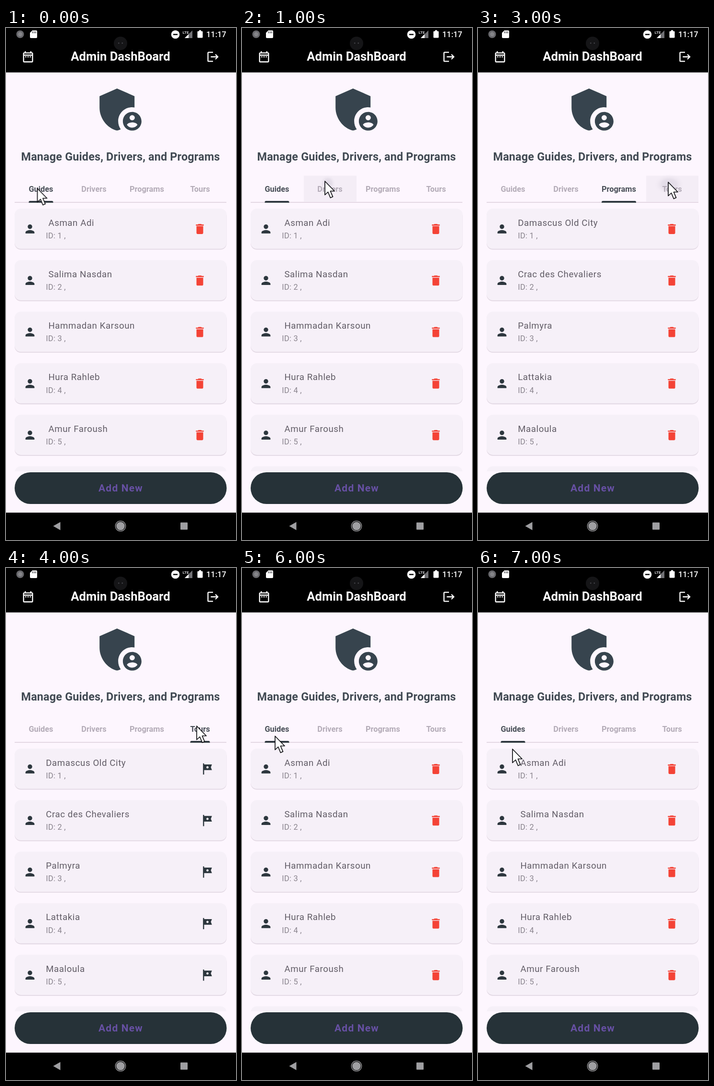
An HTML page that plays this animation: 480 by 1066 pixels, repeating every 8000 ms.

```html
<!DOCTYPE html>
<html lang="en">
<head>
<meta charset="utf-8">
<title>Admin DashBoard</title>
<style>
  html, body { margin: 0; width: 100%; height: 100%; overflow: hidden; background: #fdf6fe; }
  svg { display: block; width: 100vw; height: 100vh; font-family: Roboto, Arial, sans-serif; }
  .mid { text-anchor: middle; }
  .bold { font-weight: 700; }
  .title { font-size: 25.6px; fill: #fff; }
  .heading { font-size: 23.36px; letter-spacing: .18px; fill: #414a53; }
  .tab { font-size: 16.35px; fill: #b3abb7; }
  .tab.on { fill: #474d56; }
  .name { font-size: 18.7px; letter-spacing: .58px; fill: #625d67; white-space: pre; }
  .id { font-size: 16.35px; letter-spacing: .29px; fill: #8a848e; }
  .add { font-size: 21px; letter-spacing: 1.17px; fill: #6750a4; }
  .clock { font-size: 16.4px; font-weight: 500; fill: #fff; }

  .view, .ink { opacity: 0; animation: 8s step-end infinite; }
  #guides { animation-name: guides; }
  #drivers, #ink2 { animation-name: third; }
  #programs, #ink3 { animation-name: fourth; }
  #tours { animation-name: tours; }
  #ink1 { animation-name: second; }
  #pointer { animation: point 8s step-end infinite; }

  @keyframes guides { 0% { opacity: 1 } 25% { opacity: 0 } 75%, 100% { opacity: 1 } }
  @keyframes second { 0% { opacity: 0 } 12.5% { opacity: 1 } 25%, 100% { opacity: 0 } }
  @keyframes third { 0% { opacity: 0 } 25% { opacity: 1 } 37.5%, 100% { opacity: 0 } }
  @keyframes fourth { 0% { opacity: 0 } 37.5% { opacity: 1 } 50%, 100% { opacity: 0 } }
  @keyframes tours { 0% { opacity: 0 } 50% { opacity: 1 } 75%, 100% { opacity: 0 } }
  @keyframes point {
    0% { transform: translate(65.5px, 334px) }
    12.5% { transform: translate(173px, 319px) }
    25% { transform: translate(356.5px, 321px) }
    37.5% { transform: translate(397px, 321px) }
    50% { transform: translate(398px, 329px) }
    62.5% { transform: translate(67px, 328px) }
    75% { transform: translate(69px, 350px) }
    87.5%, 100% { transform: translate(72px, 377px) }
  }
</style>
</head>
<body>
<svg viewBox="0 0 480 1066" preserveAspectRatio="none">
  <defs>
    <path id="person" d="M12 12c2.21 0 4-1.79 4-4s-1.79-4-4-4-4 1.79-4 4 1.79 4 4 4zm0 2c-2.67 0-8 1.34-8 4v2h16v-2c0-2.66-5.33-4-8-4z"/>
    <path id="bin" d="M6 19c0 1.1.9 2 2 2h8c1.1 0 2-.9 2-2V7H6v12zM19 4h-3.5l-1-1h-5l-1 1H5v2h14V4z"/>
    <path id="flag" d="M21 4H7V2H5v20h2v-8h14l-2-5 2-5zm-6 5c0 1.1-.9 2-2 2s-2-.9-2-2 .9-2 2-2 2 .9 2 2z"/>
    <radialGradient id="glow">
      <stop offset="0" stop-color="#dfd9e5"/>
      <stop offset=".5" stop-color="#e4dde8" stop-opacity=".85"/>
      <stop offset="1" stop-color="#f4edf6" stop-opacity="0"/>
    </radialGradient>
    <clipPath id="list"><rect y="366" width="480" height="557"/></clipPath>
  </defs>

  <rect width="480" height="1066" fill="#fdf6fe"/>

  <!-- status and app bar -->
  <rect width="480" height="92.5"/>
  <circle cx="29.5" cy="13" r="8" fill="#68686c"/>
  <circle cx="29.5" cy="13" r="4.5" fill="#858589"/>
  <path d="M55 5h8a2 2 0 0 1 2 2v12a2 2 0 0 1-2 2H52a2 2 0 0 1-2-2V10z" fill="#fff"/>
  <path d="M55.5 7v4M58.8 7v4M62 7v4" stroke="#4c4c50" stroke-width="1.5"/>
  <circle cx="353.5" cy="13.5" r="8.8" fill="#fff"/>
  <path d="M349 13.5h9" stroke="#000" stroke-width="2.5"/>
  <path d="M389 5v16h-16z" fill="#707074"/>
  <path d="M381 13v8h-8z" fill="#fff"/>
  <text x="368.5" y="12" font-size="8" class="bold" fill="#d2d2d6">LTE</text>
  <path d="M403 4.5h4v2h2a1.5 1.5 0 0 1 1.5 1.5v11a1.5 1.5 0 0 1-1.5 1.5h-8a1.5 1.5 0 0 1-1.5-1.5V8a1.5 1.5 0 0 1 1.5-1.5h2z" fill="#fff"/>
  <text x="418" y="19.3" class="clock">11:17</text>
  <circle cx="239" cy="32" r="14" fill="#151517"/>
  <path d="M234 31.5h2.5M241.500 31.5h2.5" stroke="#48484e" stroke-width="2"/>
  <g fill="#fff">
    <path transform="translate(32 46) scale(1.168)" d="M7 11h2v2H7v-2zm14-5v14c0 1.1-.9 2-2 2H5c-1.11 0-2-.9-2-2l.01-14c0-1.1.88-2 1.99-2h1V2h2v2h8V2h2v2h1c1.1 0 2 .9 2 2zM5 8h14V6H5v2zm14 12V10H5v10h14zm-4-7h2v-2h-2v2zm-4 0h2v-2h-2v2z"/>
    <path transform="translate(418 46) scale(1.168)" d="M17 7l-1.41 1.41L18.17 11H8v2h10.17l-2.58 2.58L17 17l5-5zM4 5h8V3H4c-1.1 0-2 .9-2 2v14c0 1.1.9 2 2 2h8v-2H4V5z"/>
  </g>
  <text x="239" y="68.3" class="title bold mid">Admin DashBoard</text>

  <!-- shield -->
  <path fill="#37444e" transform="translate(180.6 111.4) scale(4.867)" d="M17 11c.34 0 .67.04 1 .09V6.27L10.5 3 3 6.27v4.91c0 4.54 3.2 8.79 7.5 9.82.55-.13 1.08-.32 1.6-.55-.69-.98-1.1-2.17-1.1-3.45 0-3.31 2.69-6 6-6zM17 13c-2.21 0-4 1.79-4 4s1.79 4 4 4 4-1.79 4-4-1.79-4-4-4zm0 1.38c.62 0 1.12.51 1.12 1.12s-.51 1.12-1.12 1.12-1.12-.51-1.12-1.12.5-1.12 1.12-1.12zm0 5.37c-.93 0-1.74-.46-2.24-1.17.05-.72 1.51-1.08 2.24-1.08s2.19.36 2.24 1.08c-.5.71-1.31 1.17-2.24 1.17z"/>
  <text x="239" y="276" class="heading bold mid">Manage Guides, Drivers, and Programs</text>

  <!-- tab highlights -->
  <g class="ink" id="ink1">
    <rect x="129" y="307.5" width="110" height="54" fill="#f4edf6"/>
    <circle cx="179" cy="323" r="17" fill="url(#glow)"/>
  </g>
  <g class="ink" id="ink2">
    <rect x="239.5" y="307.5" width="111" height="54" fill="#f4edf6"/>
    <ellipse cx="295" cy="329" rx="32" ry="25" fill="url(#glow)"/>
  </g>
  <g class="ink" id="ink3">
    <rect x="351" y="307.5" width="109" height="54" fill="#f4edf6"/>
    <ellipse cx="399" cy="326" rx="32" ry="22" fill="url(#glow)"/>
  </g>
  <path d="M18 363h442" stroke="#e4d8e4" stroke-width="1.8"/>

  <g id="views"></g>

  <!-- button and navigation -->
  <rect x="18" y="925" width="442.5" height="66" rx="33" fill="#263238"/>
  <text x="239.5" y="965" class="add bold mid">Add New</text>
  <rect y="1009" width="480" height="57"/>
  <g fill="#9f9fa2">
    <path d="M98.5 1037l15-8.5v17z"/>
    <circle cx="239" cy="1037" r="8.8"/>
    <rect x="364" y="1029.5" width="15" height="15" rx="1"/>
  </g>
  <circle cx="239" cy="1037" r="10.7" fill="none" stroke="#9f9fa2" stroke-width="1.3"/>

  <path id="pointer" d="M0 0V28.5L6.5 22.5L11.5 34.5L16.5 32.3L11.5 20.5H20Z" fill="#fff" stroke="#101014" stroke-width="1.7" stroke-linejoin="round"/>
</svg>
<script>
  const places = ["Damascus Old City", "Crac des Chevaliers", "Palmyra", "Lattakia", "Maaloula"];
  const tabs = [
    { label: "Guides", x: 73, w: 51, icon: "bin",
      rows: [" Asman Adi", " Salima Nasdan", " Hammadan Karsoun", " Hura Rahleb", " Amur Faroush"] },
    { label: "Drivers", x: 183.5, w: 53, icon: "bin",
      rows: [" Asman Hammadan", " Jabir Asman", " Hammadan Adi", " Adi Faroush", " Karsoun Faroush"] },
    { label: "Programs", x: 294, w: 72, icon: "bin", rows: places },
    { label: "Tours", x: 405, w: 41, icon: "flag", rows: places }
  ];
  const dark = "#2d373e";

  const icon = (id, x, fill) =>
    `<use href="#${id}" transform="translate(${x} 28.4) scale(1.168)" fill="${fill}"/>`;

  const box = y => `<g transform="translate(0 ${y})">
    <rect x="18" y="2" width="442.5" height="83.5" rx="13" fill="#e2d8e3"/>
    <rect x="18" width="442.5" height="83.7" rx="13" fill="#f6f0f8"/>`;

  const card = (name, i, end) => box(376 + i * 107.3) +
    icon("person", 36, dark) +
    (end === "bin" ? icon("bin", 390.5, "#f44336") : icon("flag", 405.3, dark)) +
    `<text x="83.2" y="35.6" class="name" xml:space="preserve">${name}</text>
     <text x="83.2" y="61.8" class="id">ID: ${i + 1} ,</text></g>`;

  const view = tab => `<g class="view" id="${tab.label.toLowerCase()}">` +
    tabs.map(t => `<text x="${t.x}" y="340.8" class="tab bold mid${t === tab ? " on" : ""}">${t.label}</text>`).join("") +
    `<path d="M${tab.x - tab.w / 2} 363.7v-1a2.6 2.6 0 0 1 2.6-2.6h${tab.w - 5.2}a2.6 2.6 0 0 1 2.6 2.6v1z" fill="${dark}"/>
    <g clip-path="url(#list)">` +
    tab.rows.map((name, i) => card(name, i, tab.icon)).join("") + box(912.5) + "</g></g></g>";

  document.getElementById("views").innerHTML = tabs.map(view).join("");
</script>
</body>
</html>
```
